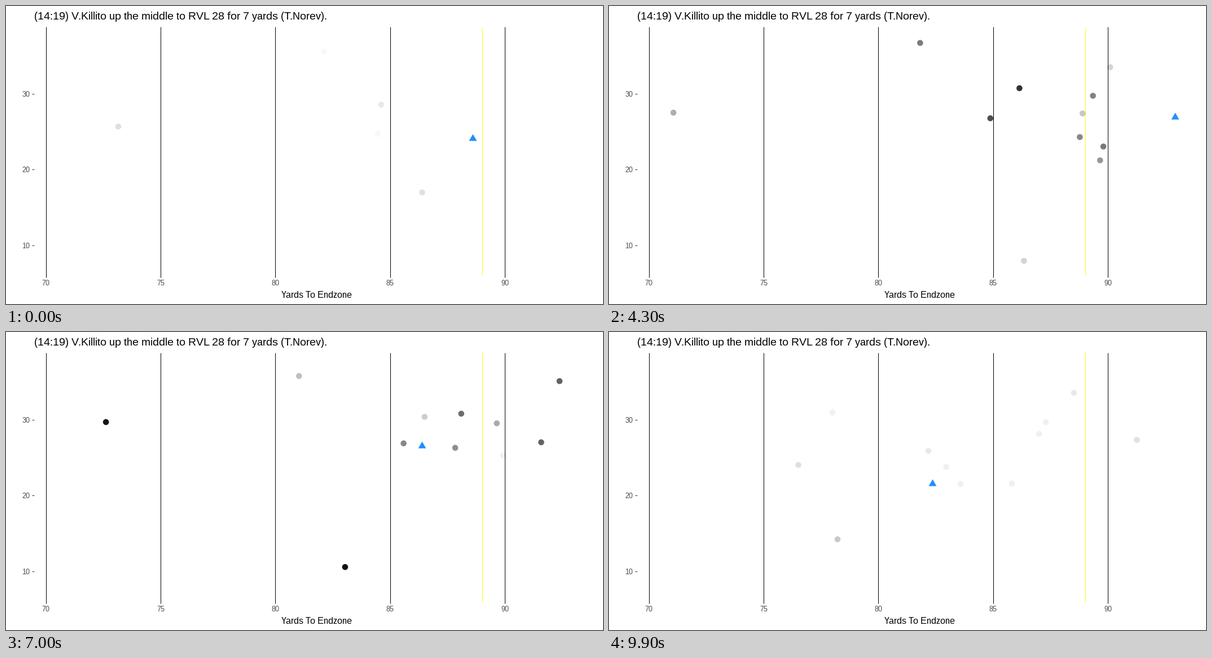
Write a matplotlib script that moves like this. It is 1058 by 529 pixels and loops after 10 s.

```python
import numpy as np
import matplotlib.pyplot as plt
from matplotlib.animation import FuncAnimation

WIDTH, HEIGHT, DPI = 1058, 529, 100
FRAMES, INTERVAL = 100, 100
PX = 72 / DPI  # points per pixel
SNAP = 18
MOMENTS = (SNAP, 35, 62, 78, 99)
EFFORT_WIDTH = 22
FRAME = np.arange(FRAMES)

plt.rcParams.update({"font.family": "Liberation Sans",
                     "text.hinting": "native", "text.hinting_factor": 1})


def smoothstep(start, end):
    u = np.clip((FRAME - start) / (end - start), 0, 1)
    return u * u * (3 - 2 * u)


def run(*points, drift=(0, 0), times=MOMENTS):
    """Drift steadily until the snap, then follow a smooth curve."""
    times, points = np.array(times), np.array(points, float)
    speed = np.array(drift) / SNAP
    slopes = np.gradient(points, times, axis=0)
    slopes[0] = speed

    i = np.clip(np.searchsorted(times, FRAME, side="right") - 1, 0, len(times) - 2)
    span = (times[i + 1] - times[i])[:, None]
    u = (FRAME - times[i])[:, None] / span
    curve = ((1 + 2 * u) * (1 - u) ** 2 * points[i]
             + u * (1 - u) ** 2 * span * slopes[i]
             + u * u * (3 - 2 * u) * points[i + 1]
             + u * u * (u - 1) * span * slopes[i + 1])
    waiting = points[0] + (FRAME - SNAP)[:, None] * speed
    return np.where(FRAME[:, None] < SNAP, waiting, curve)


def defender(peak, strength, *points, drift=(0, 0)):
    """Path and opacity; the opacity swells around the moment of most effort."""
    effort = strength * np.exp(-((FRAME - peak) / EFFORT_WIDTH) ** 2)
    resting = np.maximum(0.06 * smoothstep(0, SNAP), min(0.12, 0.012 * np.hypot(*drift)))
    shade = np.maximum(resting, effort * smoothstep(10, 35))
    return run(*points, drift=drift), shade


free_safety = defender(66, .95, (171, 210), (127.5, 202), (127, 158), (234, 169.5),
                       (335.5, 236), drift=(-28, -4))
left_corner = defender(50, .57, (562, 80), (553.5, 71), (538, 63), (494, 97),
                       (396, 143), drift=(-2, -1))
left_backer = defender(44, .8, (671, 171), (700, 152.5), (774, 142), (696, 163.5),
                       (566, 211), drift=(6, -4))
middle_backer = defender(53, .85, (657, 226), (665, 212), (703, 179.5), (698, 221),
                         (623, 270), drift=(-2, -1))
left_edge = defender(68, .62, (811, 150), (855, 123), (967, 83), (976, 94.5), (824, 108))
left_tackle = defender(53, .6, (805, 189), (841, 166), (880, 156), (850.5, 169.5), (762, 181))
nose = defender(65, .6, (805, 222), (841.5, 206), (809.5, 151), (803.5, 143.5), (774, 160))
right_backer = defender(56, .66, (802, 261), (817.5, 241), (847, 215), (734, 201),
                        (597.5, 239.5))
right_tackle = defender(35, .6, (797.5, 293.5), (850, 266), (908, 217), (841, 227), (714, 269))
right_edge = defender(60, .75, (782, 325.5), (850, 300), (911, 205), (978, 192),
                      (935.5, 191.5), drift=(44.5, -5.5))
right_corner = defender(72, .95, (770.5, 446), (757, 453), (649.5, 436), (548, 397.5),
                        (405, 368))

team = (free_safety, left_corner, left_backer, middle_backer, left_edge, left_tackle,
        nose, right_backer, right_tackle, right_edge, right_corner)
paths = np.stack([path for path, _ in team], axis=1)
shades = np.stack([shade for _, shade in team], axis=1)
runner = run((831, 235.3), (974, 213.3), (1003, 195), (823.5, 185.3), (660, 224.3),
             (572.5, 269.3), drift=(4, 0), times=(SNAP, 35, 44, 62, 78, 99))

fig = plt.figure(figsize=(WIDTH / DPI, HEIGHT / DPI), dpi=DPI, facecolor="white")
ax = fig.add_axes([0, 0, 1, 1])
ax.set(xlim=(0, WIDTH), ylim=(HEIGHT, 0))
ax.axis("off")


def label(x, y, text, size, color="black", ha="center"):
    ax.text(x, y, text, fontsize=size * PX, color=color, ha=ha, va="baseline")


label(50, 23.5, "(14:19) V.Killito up the middle to RVL 28 for 7 yards (T.Norev).", 19, ha="left")
label(550, 518, "Yards To Endzone", 16)

for yards in range(70, 91, 5):
    x = 70.5 + 40.68 * (yards - 70)
    ax.vlines(x, 37, 482, color="black", lw=PX, zorder=1)
    label(x, 496.5, str(yards), 13, "#4d4d4d")
for yards in (10, 20, 30):
    y = 558.7 - 13.42 * yards
    ax.hlines(y, 46, 50, color="#333333", lw=PX)
    label(42.5, y + 5, str(yards), 13, "#4d4d4d", ha="right")
ax.vlines(843.5, 37, 479, color="yellow", lw=PX, zorder=1)

dots = ax.scatter(*paths[0].T, s=(10.6 * PX) ** 2, linewidths=0, zorder=3)
triangle, = ax.plot([], [], marker=(3, 0, 0), ms=16.1 * PX, mew=0,
                    color="dodgerblue", ls="none", zorder=4)


def update(frame):
    colors = np.zeros((len(team), 4))
    colors[:, 3] = shades[frame]
    dots.set_offsets(paths[frame])
    dots.set_facecolors(colors)
    triangle.set_data(*runner[frame:frame + 1].T)
    return dots, triangle


anim = FuncAnimation(fig, update, frames=FRAMES, interval=INTERVAL, repeat=True,
                     repeat_delay=0, blit=False)
plt.show()
```
